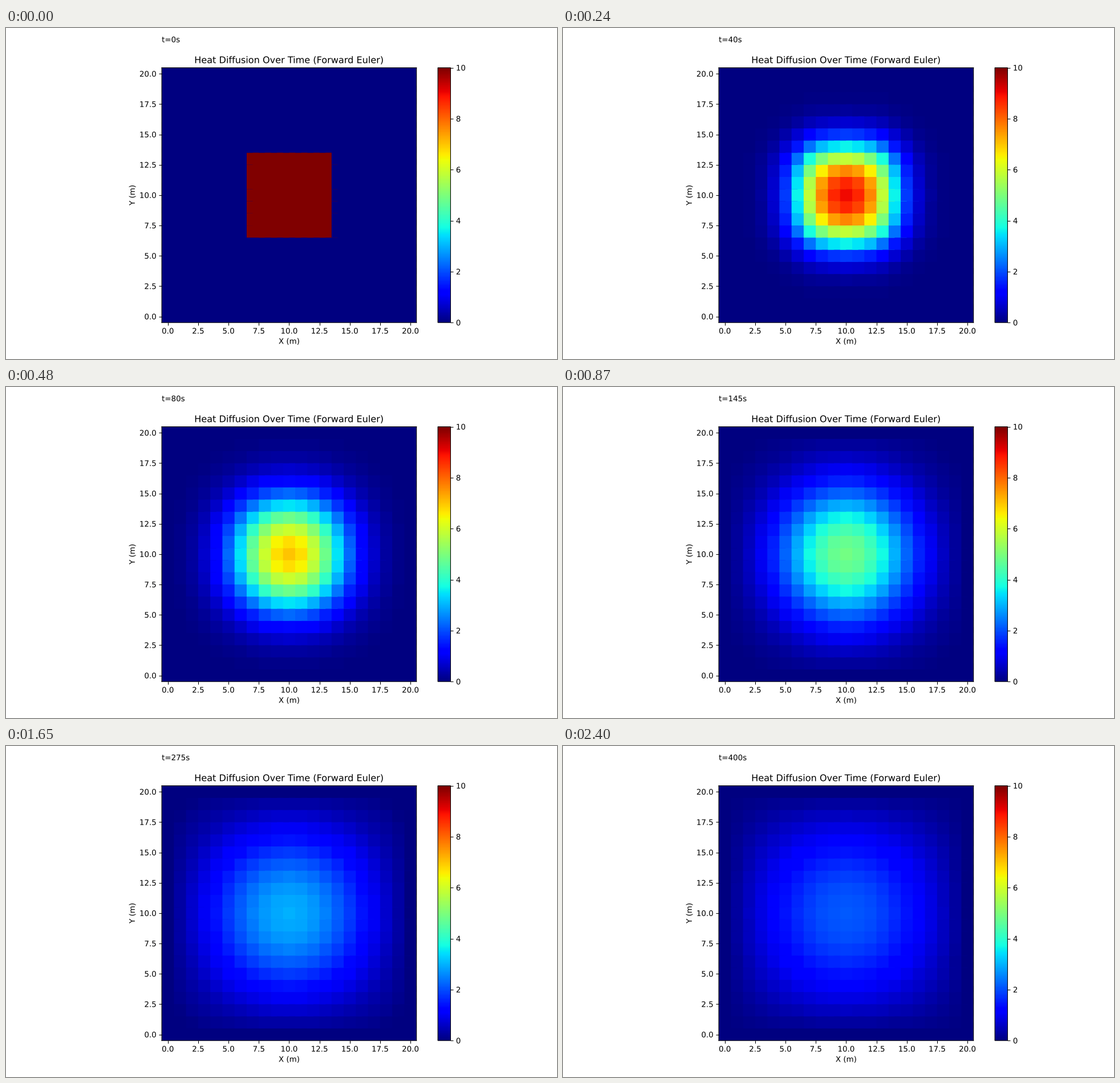
Animation of 966x580 px, one loop 2.43 s. Source, as a matplotlib script:

```python
import numpy as np
import matplotlib.pyplot as plt
from matplotlib.animation import FuncAnimation
from matplotlib.collections import PolyCollection
from matplotlib.patheffects import Normal
from matplotlib.text import Text

WIDTH, HEIGHT, DPI = 966, 580, 96.6
FRAMES, INTERVAL = 81, 30        # 2430 ms per loop
SECONDS_PER_FRAME = 5
N = 21                           # grid points per side, 1 m apart
ALPHA = 0.0401                   # diffusivity, m^2/s
DT = 0.05                        # Euler step, s
T_MAX = 10

plt.rcParams.update({
    "font.family": "DejaVu Sans",
    "text.hinting": "none",
    "path.snap": False,
})


def diffuse(u, steps):
    """Advance the field by forward Euler with cold, fixed edges."""
    u = u.copy()
    for _ in range(steps):
        lap = (u[2:, 1:-1] + u[:-2, 1:-1] + u[1:-1, 2:] + u[1:-1, :-2]
               - 4 * u[1:-1, 1:-1])
        u[1:-1, 1:-1] += ALPHA * DT * lap
    return u


def solve():
    u = np.zeros((N, N))
    u[7:14, 7:14] = T_MAX
    fields = [u]
    steps = round(SECONDS_PER_FRAME / DT)
    for _ in range(FRAMES - 1):
        fields.append(diffuse(fields[-1], steps))
    return fields


def cell(x, y):
    """Square that reaches under its right and upper neighbours, so that
    smooth edges leave no seams."""
    x0, y0 = x - 0.5, y - 0.5
    x1, y1 = min(x + 1, N - 0.5), min(y + 1, N - 0.5)
    return [(x0, y0), (x1, y0), (x1, y1), (x0, y1)]


fields = solve()

# The tiny margin keeps float rounding from losing a pixel.
fig, ax = plt.subplots(
    figsize=((WIDTH + 1e-6) / DPI, (HEIGHT + 1e-6) / DPI), dpi=DPI)
cells = PolyCollection([cell(x, y) for y in range(N) for x in range(N)],
                       array=fields[0].ravel(), cmap="jet",
                       edgecolors="none", linewidths=0, antialiaseds=True)
cells.set_clim(0, T_MAX)
ax.add_collection(cells)
ax.set(xlim=(-0.5, N - 0.5), ylim=(-0.5, N - 0.5), aspect="equal",
       title="Heat Diffusion Over Time (Forward Euler)",
       xlabel="X (m)", ylabel="Y (m)")
fig.colorbar(cells, ax=ax)
clock = ax.text(0, 1.1, "t=0s", transform=ax.transAxes)

# Draw text as outlines, placed at fractions of a pixel.
fig.draw_without_rendering()
for label in fig.findobj(Text):
    label.set_path_effects([Normal()])


def update(frame):
    cells.set_array(fields[frame].ravel())
    clock.set_text(f"t={frame * SECONDS_PER_FRAME}s")
    return cells, clock


anim = FuncAnimation(fig, update, frames=FRAMES, interval=INTERVAL,
                     repeat=True, repeat_delay=0, blit=False)
plt.show()
```
